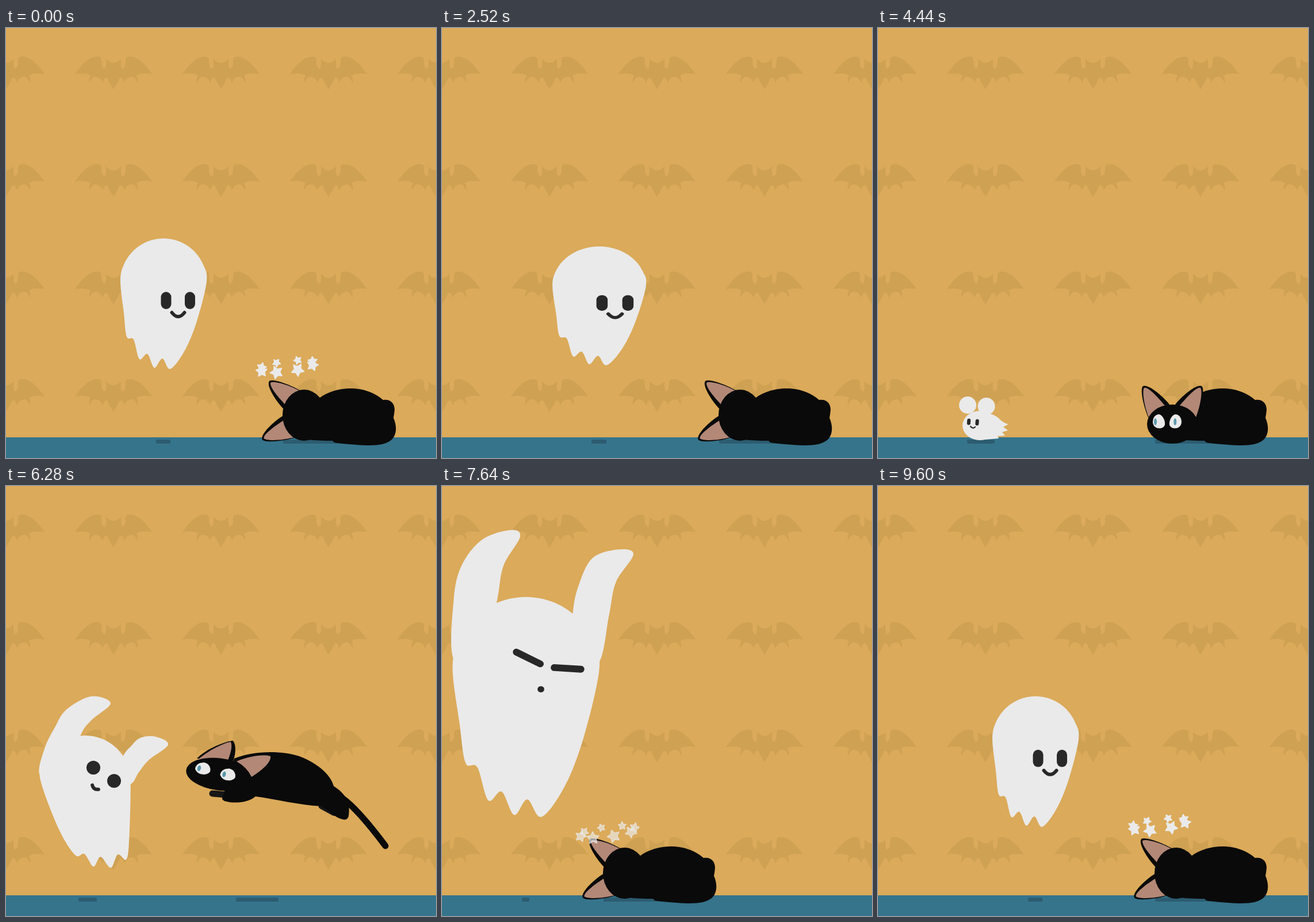
Write an HTML page with a canvas that moves like this. It is 748x748 px and loops after 9.64 s.

```html
<!DOCTYPE html>
<html lang="en">
<head>
<meta charset="utf-8">
<title>Ghost and cat</title>
<style>
html, body { margin: 0; width: 100%; height: 100%; overflow: hidden; background: #dbaa5a; }
canvas { display: block; width: 100vw; height: 100vh; }
</style>
</head>
<body>
<canvas id="stage" width="748" height="748"></canvas>
<script>
const c = document.getElementById('stage').getContext('2d');
const LOOP = 9640, STEP = 40, TAU = Math.PI * 2;
const WHITE = '#eaeaea', BLACK = '#0a0a0a', INK = '#282828', PINK = '#b38877', IRIS = '#5c98ac', SHADE = '#2c5c70';

const mix = (a, b, u) => a + (b - a) * u;
const mixAll = (a, b, u) => a.map((v, i) => mix(v, b[i], u));
const ramp = (t, a, b) => Math.max(0, Math.min(1, (t - a) / (b - a)));
const ease = (t, a, b) => { const u = ramp(t, a, b); return u * u * (3 - 2 * u); };

// Rows are [time, values...]
function track(rows, t) {
  let i = 0;
  while (i < rows.length - 2 && rows[i + 1][0] <= t) i++;
  const a = rows[i], b = rows[i + 1], u = ease(t, a[0], b[0]);
  return { v: mixAll(a, b, u), a, b, u };
}

function group(paint, x = 0, y = 0, turn = 0, sx = 1, sy = sx) {
  c.save();
  c.translate(x, y);
  c.rotate(turn);
  c.scale(sx, sy);
  paint();
  c.restore();
}
const paths = {};
function fill(color, d) {
  c.fillStyle = color;
  c.fill(paths[d] ||= new Path2D(d));
}
function disc(color, x, y, rx, ry = rx, turn = 0) {
  c.fillStyle = color;
  c.beginPath();
  c.ellipse(x, y, rx, ry, turn, 0, TAU);
  c.fill();
}
function pill(color, x, y, w, h, turn = 0, r = Math.min(w, h) / 2) {
  group(() => {
    c.fillStyle = color;
    c.beginPath();
    c.roundRect(-w / 2, -h / 2, w, h, r);
    c.fill();
  }, x, y, turn);
}
function curve(color, width, x, y, cx, cy, ex, ey) {
  c.beginPath();
  c.moveTo(x, y);
  c.quadraticCurveTo(cx, cy, ex, ey);
  c.strokeStyle = color;
  c.lineWidth = width;
  c.lineCap = 'round';
  c.stroke();
}
const shadow = (x, w) => pill(SHADE, x, 719.5, w, 7, 0, 2);

// Closed smooth curve through a flat list of points
function blob(p) {
  const n = p.length, q = i => p[(i + n) % n], d = i => (q(i + 2) - q(i - 2)) / 6;
  c.beginPath();
  c.moveTo(p[0], p[1]);
  for (let i = 0; i < n; i += 2)
    c.bezierCurveTo(q(i) + d(i), q(i + 1) + d(i + 1),
      q(i + 2) - d(i + 2), q(i + 3) - d(i + 3), q(i + 2), q(i + 3));
  c.fillStyle = WHITE;
  c.fill();
}

// ---- Room ----
const BAT = 'M1 12Q-6 12-13 5V14Q-13 21-16 22Q-22 19-21 8Q-21 1-26 1Q-44-2-67 31Q-46 28-40 34Q-43 38-42 46Q-36 34-31 36Q-23 36-19 46Q-15 34-10 39Q-8 45 0 57H1Z';
function room() {
  c.fillStyle = '#dbaa5a';
  c.fillRect(0, 0, 748, 748);
  for (let y = 49; y < 700; y += 187)
    for (let x = 0; x < 800; x += 187)
      for (const side of [1, -1]) group(() => fill('#cfa153', BAT), x, y, 0, side, 1);
  c.fillStyle = '#36748c';
  c.fillRect(0, 712, 748, 36);
}

// ---- Ghost, measured from the top of its head ----
const DOME = Array.from({ length: 9 }, (_, i) => [-75 * Math.cos(i * TAU / 16), 75 - 75 * Math.sin(i * TAU / 16)]).flat();
const FLOAT = [58, 144, 37, 195, 12, 227, -2, 209, -16, 225, -28, 201, -42, 210, -52, 176, -64, 171, -69, 130];
const RISE = [78, 111, 73, 190, 67, 216, 53, 207, 40, 230, 23, 211, 10, 228, -5, 206, -21, 208, -48, 163];
const ARMS = [
  { base: [-50, 75],
    tall: [-74, 64, -74, 4, -66, -32, -45, -59, -16, -69, -6, -62, -23, -32, -30, 6, -45, 70],
    bent: [-79, 69, -71, 23, -53, -14, -33, -45, 10, -68, 44, -56, 10, -26, -9, 1, -40, 80] },
  { base: [50, 75],
    tall: [48, 17, 54, -12, 68, -40, 94, -49, 110, -44, 92, -15, 85, 19, 74, 69, 45, 75],
    bent: [65, 37, 80, 18, 96, 4, 122, 2, 144, 16, 110, 43, 93, 64, 78, 85, 45, 85] }
];
// eye x y, eye x y, eye w h, turns, mouth x y, half width, depth, turn, line
const FACES = [
  [4.5, 108, 46, 108, 18, 30, 0, 0, 25.5, 129, 11, 14, 0, 6],
  [2, 109, 42.5, 112, 21, 17, 0, 0, 20, 138, .1, 0, 0, 9.5],
  [14, 56, 50, 79, 24, 24, 0, 0, 17.5, 90, 6.5, 6, .6, 6],
  [2.4, 63, 42.6, 73.8, 34.5, 7, .46, .06, 15.3, 95.3, .3, 0, 0, 6.3]
];
const MOOD = [[1000, 0], [1320, 1], [1640, 1], [1960, 0], [5000, 0], [5001, 2], [6280, 2], [6560, 3], [8000, 3], [8920, 0]];
// time, x, top, scale x, scale y
const GHOST = [
  [0, 274, 366, 1, 1],
  [500, 274, 350.5, 1, 1],
  [1320, 275, 370, .98, .98],
  [1600, 273, 384, 1.09, .91],
  [1960, 274, 294, .95, 1.05],
  [2520, 273.5, 380, 1.085, .91],
  [2740, 400, 212, .9, 1.1],
  [2880, 640, 300, .8, .8],
  [3000, 540, 560, .35, .35],
  [5880, 150, 655, .3, .3],
  [6000, 140, 590, .55, .55],
  [6280, 138, 434, 1, 1],
  [6560, 146, 187, 1.74, 1.73],
  [6760, 146, 193, 1.7, 1.685],
  [7680, 146, 193, 1.7, 1.685],
  [8000, 148, 186, 1.18, 1.15],
  [8920, 273, 358, 1, 1],
  [9160, 274, 356, 1, 1],
  [LOOP, 274, 366, 1, 1]
];
function ghostFace(f) {
  pill(INK, f[0], f[1], f[4], f[5], f[6]);
  pill(INK, f[2], f[3], f[4], f[5], f[7]);
  group(() => curve(INK, f[13], -f[10], 0, 0, f[11], f[10], 0), f[8], f[9], f[12]);
}
function ghost(t) {
  const [, x, top, sx, sy] = track(GHOST, t).v;
  const rise = t > 5000 ? 1 - ease(t, 6280, 6560) : 0;
  const arms = ease(t, 5960, 6280) * (1 - ease(t, 7680, 8000));
  const lean = 4 * arms - 13 * ease(t, 1000, 1320) * (1 - ease(t, 1400, 1960));
  const mood = track(MOOD, t);
  shadow(x + mix(-.5, 4, rise), 13 + Math.max(0, top - 193) * .07 + rise * 2);
  group(() => {
    const body = [...DOME.map(v => v * mix(1, 1.04, rise)), ...mixAll(FLOAT, RISE, rise)];
    blob(body.map((v, i) => i % 2 ? v : v + lean * Math.max(0, (body[i + 1] - 75) / 150) ** 1.4));
    if (arms)
      for (const arm of ARMS)
        blob(mixAll(arm.tall, arm.bent, rise).map((v, i) => mix(arm.base[i % 2], v, arms)));
    ghostFace(mixAll(FACES[mood.a[1]], FACES[mood.b[1]], mood.u));
  }, x, top, 0, sx, sy);
}

// ---- Mouse: time, x, y ----
const MOUSE = [[3000, 525, 640], [3160, 480, 585], [3440, 370, 717], [4000, 187, 717], [4440, 187, 717],
  [4760, 176, 717], [5040, 187, 717], [5400, 170, 717], [5880, 150, 717]];
function mouse(t) {
  const [, x, y] = track(MOUSE, t).v;
  const hop = Math.abs(Math.sin(ramp(t, 3440, 4000) * TAU * 1.5)) * 14;
  shadow(x - 8, 48 - (717 - y) * .2);
  group(() => {
    disc(WHITE, 156, 656, 15);
    disc(WHITE, 188.5, 658, 15);
    disc(WHITE, 177, 691.5, 30, 25.5);
    fill(WHITE, 'M180 667Q205 672 212 681Q220 688 227 689L218 694L226 700L216 703L221 709L208 710L210 714L175 717Z');
    pill(INK, 158, 685, 6, 11, .08);
    pill(INK, 172.5, 686, 6, 11, .08);
    curve(INK, 2.2, 161, 693, 165, 698, 169, 694);
  }, x - 187, y - hop - 717);
}

// ---- Cat ----
function lyingBody() {
  fill(BLACK, 'M535 652C555 633 578 627 600 627C625 627 645 637 656 647C669 645 676 653 676 664Q675 674 674 678C680 692 680 706 672 715C660 727 637 727 610 725Q580 723 571 721L568 718Q545 718 525 716Z');
}
// Centred on the head
function ears() {
  for (const side of [1, -1])
    group(() => {
      fill(BLACK, 'M-40-7C-50-29-56-58-52-65C-44-73-12-45-3-31Z');
      fill(PINK, 'M-40-9C-49-31-53-57-49-63C-41-65-23-44-12-31Q-30-24-40-9Z');
    }, 0, 0, 0, side, 1);
}
function awakeHead() {
  ears();
  disc(BLACK, 0, 0, 44, 34);
  for (const side of [1, -1])
    group(() => fill(WHITE, 'M-28-3C-28-13-22-17-17-17C-10-15-6-5-7 1C-9 10-27 10-28-3Z'), side < 0 ? -12 : -6, 0, 0, side, 1);
  disc(IRIS, -29.5, -4, 2.5, 6);
  disc(IRIS, 4.8, -4, 2.5, 6);
}
function leapingCat() {
  pill('#171717', 371, 536, 35, 11, .08);
  pill('#171717', 560, 562, 36, 12, .5);
  fill(BLACK, 'M397 474C430 460 480 460 510 470C545 483 566 505 570 522C590 535 600 550 596 574Q594 582 586 580C572 577 564 566 548 557C510 555 470 545 434 540C422 551 396 553 380 548Q373 545 378 538Z');
  curve(BLACK, 11, 585, 543, 612, 562, 660, 626);
  fill(BLACK, 'M332 474C345 460 375 446 394 443C400 446 401 465 394 482Z');
  fill(PINK, 'M335 475C350 462 375 448 391 445Q395 455 386 477Z');
  disc(BLACK, 371, 501.5, 58, 28, .13);
  fill(PINK, 'M401 479C420 471 445 466 460 470C462 480 445 495 427 506Q420 490 401 479Z');
  for (const i of [0, 1])
    group(() => {
      fill(WHITE, 'M329 492C330 484 337 481 345 481C353 483 357 490 355 497C350 504 333 504 329 492Z');
      disc(IRIS, 336, 491, 3, 5, .25);
    }, i * 43.5, i * 10.5);
}
const LEAP = [[6040, 70, 80, .3], [6280, 0, 0, 0], [6480, -35, -14, -.08]];
const FALL = [[6480, -150, -190, .9], [6960, -201, 0, 0], [7060, -201, -16, 0],
  [7160, -201, 0, 0], [8040, -201, 0, 0], [8920, 0, 0, 0]];

function leap(t) {
  const [, x, y, turn] = track(LEAP, t).v;
  shadow(437 + x, 74);
  group(() => group(leapingCat, -460, -510), x + 460, y + 510, turn);
}
function watch(t) {
  const crouch = ramp(t, 4700, 5000);
  const wiggle = Math.sin(Math.max(0, t - 5200) / 60) * 3;
  const pop = Math.sin(ramp(t, 3060, 3300) * TAU / 2) * 30;
  const grow = ramp(t, 5040, 5320);
  shadow(545, 126);
  if (grow)
    curve(BLACK, 12, 665, 705, mix(665, 702, grow), 702,
      mix(665, 706 + Math.sin(t / 110) * 6, grow), mix(705, 615, grow));
  group(() => group(lyingBody, -575, -725), 575 + wiggle, 725, 0, 1, 1 - .04 * crouch);
  group(awakeHead, 512 - wiggle / 3, 689 + crouch * 2 - pop);
}
function dazed(t) {
  const [, x, y, turn] = t < 6480 ? [0, 0, 0, 0] : track(FALL, t).v;
  shadow(545 + x, 126 + y * .25);
  group(() => group(() => {
    lyingBody();
    group(ears, 517, 673, -1.45);
    disc(BLACK, 518.5, 673.5, 37.5, 44.5);
  }, -570, -680), x + 570, y + 680, turn);
}
function cat(t) {
  const pose = t < 3060 || t >= 6480 ? dazed : t < 6040 ? watch : leap;
  pose(t);
}

// ---- Dizzy stars ----
function star(x, y, r, turn) {
  c.beginPath();
  for (let i = 0; i < 10; i++) {
    const a = turn + i * TAU / 10, d = i % 2 ? r * .52 : r;
    c.lineTo(x + Math.cos(a) * d, y + Math.sin(a) * d);
  }
  c.closePath();
  c.fill();
  c.stroke();
}
function stars(t) {
  const late = t > 7000;
  const show = late ? ramp(t, 7440, 7740) : 1 - ramp(t, 1800, 2040);
  if (!show) return;
  const time = late ? t - LOOP : t;
  const shift = late ? track(FALL, t).v[1] : 0;
  const drop = late ? 15 * (1 - ramp(t, 7600, 7960)) : 0;
  const ring = Array.from({ length: 8 }, (_, i) => (i + .5) * TAU / 8 + time * .0014875);
  ring.sort((a, b) => Math.sin(a) - Math.sin(b));
  c.save();
  c.globalAlpha = show;
  c.fillStyle = c.strokeStyle = WHITE;
  c.lineWidth = 1.6;
  c.lineJoin = 'round';
  for (const a of ring) {
    const x = Math.cos(a) * 48, y = Math.sin(a);
    star(489 + shift + x, 588.5 + drop + y * 9 - x * .12, 9.3 + y * 2.3, a * 2 + .4);
  }
  c.restore();
}

function draw(now) {
  const t = Math.floor((now % LOOP) / STEP) * STEP;
  room();
  if (t < 3000 || t >= 5880) ghost(t);
  else mouse(t);
  cat(t);
  stars(t);
}
const start = performance.now();
function tick() {
  draw(performance.now() - start);
  requestAnimationFrame(tick);
}
tick();
</script>
</body>
</html>
```
